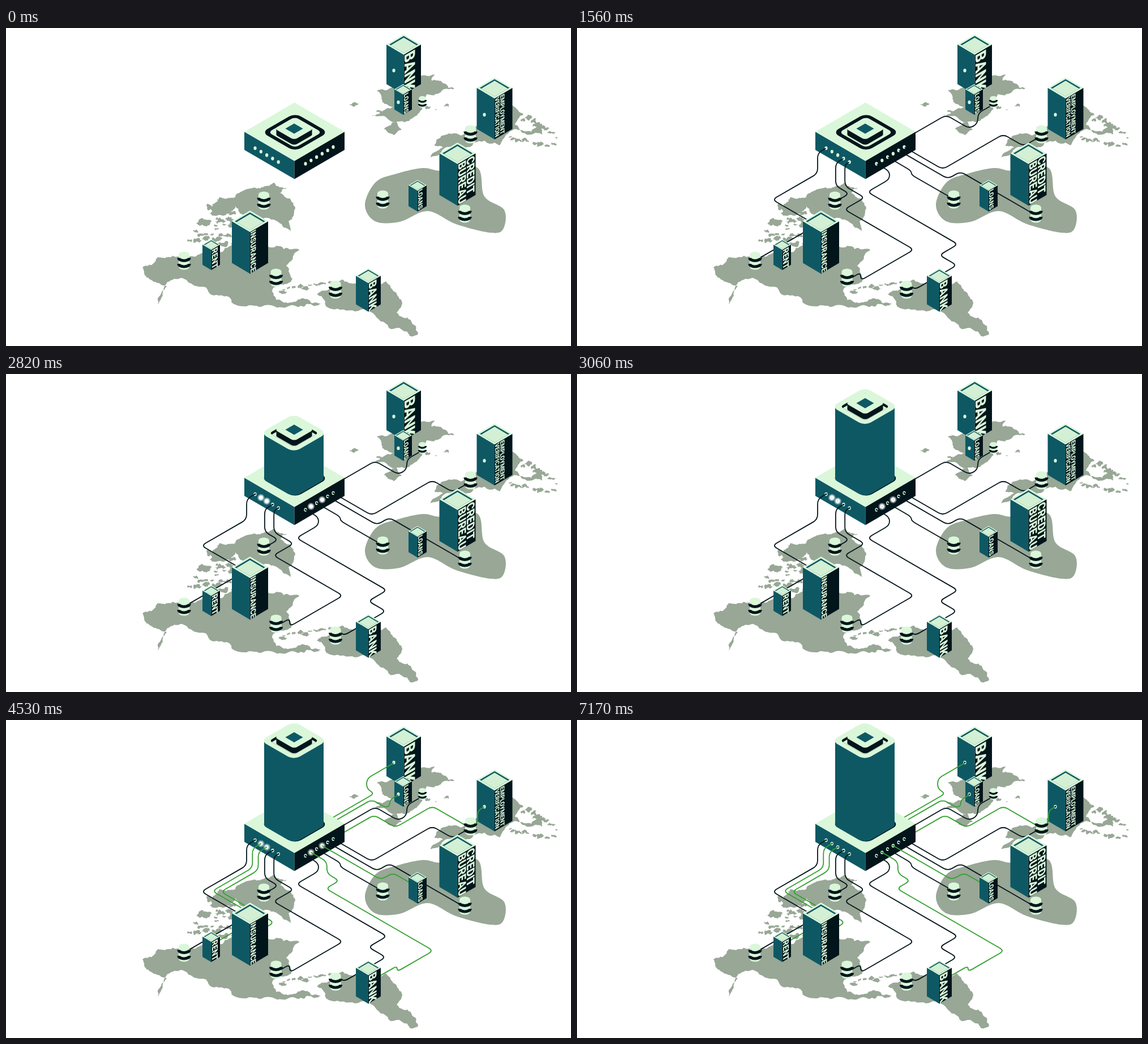
Write an HTML page that moves like this. It is 998 by 561 pixels and loops after 8.16 s.

```html
<!DOCTYPE html>
<html lang="en">
<head>
<meta charset="utf-8">
<title>Connected data network</title>
<style>
html, body { margin: 0; width: 100%; height: 100%; overflow: hidden; background: #fff; }
svg { display: block; width: 100vw; height: 100vh; }
text { font-family: Roboto, Inter, sans-serif; font-weight: 900; fill: #daf7da; }
.wire { fill: none; stroke-width: 1.8; }
</style>
</head>
<body>
<svg id="stage" viewBox="0 0 998 561"></svg>
<script>
const MINT = '#daf7da', TEAL = '#0e5864', DARK = '#02151b', LAND = '#98a796',
      GREEN = '#33a02f', BLUE = '#1e84a8', LOOP = 8160, SLOPE = .577;
const stage = document.getElementById('stage');
const clamp = v => Math.max(0, Math.min(1, v));
const easeOut = (t, start, span) => 1 - (1 - clamp((t - start) / span)) ** 2.1;
const points = s => s.split(' ').map(p => p.split(',').map(Number));
const series = (n, make) => Array.from({ length: n }, (_, i) => make(i));

let seed = 11;
const rnd = () => (seed = seed * 16807 % 2147483647) / 2147483647;

// ---- land ----
// Midpoint displacement turns a few key points into a ragged coast
function rough(pts, amount, depth) {
  if (!depth) return pts;
  const out = [];
  pts.forEach(([x, y], i) => {
    const [u, v] = pts[(i + 1) % pts.length], k = (rnd() - .5) * amount;
    out.push([x, y], [(x + u) / 2 + (v - y) * k, (y + v) / 2 - (u - x) * k]);
  });
  return rough(out, amount, depth - 1);
}
const shape = (pts, fill = LAND) => `<polygon points="${pts.map(p => p.map(v => v.toFixed(1))).join(' ')}" fill="${fill}"/>`;
const coast = s => shape(rough(points(s), .36, 4));

// Closed Catmull-Rom curve through the key points
function smooth(s) {
  const p = points(s), n = p.length, at = i => p[(i + n) % n];
  const pull = (a, b, c) => a.map((v, j) => v + (c[j] - b[j]) / 6);
  const arcs = p.map((q, i) => `C${pull(q, at(i - 1), at(i + 1))} ${pull(at(i + 1), at(i + 2), q)} ${at(i + 1)}`);
  return `<path d="M${p[0]}${arcs.join('')}Z" fill="${LAND}"/>`;
}

// Scatter of small islands along a line
const islands = (x0, y0, x1, y1, spread, count, size) => series(count, i => {
  const k = (i + rnd()) / count, r = size * (.4 + rnd());
  const x = x0 + (x1 - x0) * k, y = y0 + (y1 - y0) * k + (rnd() - .5) * spread;
  return shape(rough(series(6, j => {
    const q = r * (.5 + rnd());
    return [x + Math.cos(j * 1.047) * q * 1.4, y + Math.sin(j * 1.047) * q * .7];
  }), .7, 2));
}).join('');

const land =
  // North America, Arctic, Greenland
  coast('241,422 268,404 304,403 346,397 400,382 463,386 518,391 495,419 506,443 470,463 478,480 504,484 528,478 556,486 515,492 443,490 376,472 320,446 298,442 268,488 284,455 248,440') +
  series(5, i => islands(372 - 13 * i, 306 + 18 * i, 405, 306 + 18 * i, 14, 9, 5)).join('') +
  coast('378,298 408,298 402,320 360,328') +
  coast('403,304 432,283 474,273 497,281 484,291 511,318 499,341 503,358 455,336 412,325') +
  islands(484, 463, 574, 450, 7, 12, 4) +
  // South America
  coast('549,470 577,448 612,451 672,447 684,464 699,488 690,502 728,540 714,544 652,507 570,494') +
  // Europe
  coast('655,111 690,104 757,82 752,93 792,107 743,117 736,139 712,164 646,155 684,140') +
  coast('668,178 690,164 699,179 686,189') + coast('606,135 614,131 623,134 614,139') +
  islands(648, 148, 785, 140, 14, 10, 3) +
  // Asia
  coast('750,228 772,211 757,208 770,190 832,172 895,137 914,152 899,171 908,180 872,207 800,211') +
  coast('908,180 946,174 947,188 918,187') +
  islands(895, 148, 974, 190, 12, 14, 4) + islands(885, 194, 968, 207, 6, 14, 3.5) +
  // Africa
  smooth('634,312 653,272 690,257 736,247 770,252 832,246 845,297 880,321 878,355 855,361 795,346 745,323 695,342 652,341');

// ---- isometric parts ----
const tile = (cx, cy, a, r, fill) =>
  `<rect x="${-a}" y="${-a}" width="${2 * a}" height="${2 * a}" rx="${r}" fill="${fill}" transform="matrix(.866 .5 -.866 .5 ${cx} ${cy})"/>`;
const diamond = (cx, cy, w, h, fill) => shape([[cx, cy - h], [cx + w, cy], [cx, cy + h], [cx - w, cy]], fill);
const side = (cx, cy, w, h, H, fill) => shape([[cx + w, cy], [cx, cy + h], [cx, cy + h + H], [cx + w, cy + H]], fill);
const box = (cx, cy, w, h, H) =>
  side(cx, cy, -w, h, H, TEAL) + side(cx, cy, w, h, H, DARK) + diamond(cx, cy, w, h, MINT);

// Lettering runs down the right face, the last line next to the front edge
function building(cx, top, w, size, ...lines) {
  const h = w * .59, cy = top + h;
  const text = lines.map((s, i) => {
    const shift = (lines.length - 1 - i) * size * .8;
    return `<text font-size="${size}" transform="matrix(0 1 -1 ${SLOPE} ${cx + 1.2 + shift} ${cy + h - shift * SLOPE})">${s}</text>`;
  });
  return box(cx, cy, w, h, w * 2.3) + diamond(cx, cy, w * .83, h * .83, TEAL) +
    diamond(cx, cy + h * .08, w * .75, h * .75, '#d3f0d4') + text.join('');
}

function drum([x, y], s = 1) {
  const band = v => `<path d="M-9.5 ${v}A9.5 5 0 0 0 9.5 ${v}" fill="none" stroke="${DARK}" stroke-width="5.2"/>`;
  return `<g transform="translate(${x} ${y}) scale(${s})"><path d="M-9.5-10A9.5 5.5 0 0 1 9.5-10V11A9.5 5.5 0 0 1-9.5 11Z" fill="${MINT}"/>${band(-4.5)}${band(6)}</g>`;
}

const port = ([x, y]) => `<ellipse cx="${x}" cy="${y}" rx="2.6" ry="3.2" fill="${MINT}"/>`;
const plug = ([x, y]) => `<circle cx="${x}" cy="${y}" r="1.4" fill="${DARK}"/>`;
const glow = ([x, y]) => `<circle cx="${x}" cy="${y}" r="7" fill="url(#halo)"/>`;

const ports = [...series(5, i => [440 + 10.3 * i, 212 + 6.1 * i]), ...series(6, i => [529 + 9.8 * i, 239.5 - 5.9 * i])];
const lit = [1, 2, 6, 8].map(i => ports[i]);
const doors = points('685,75 693,131 845,153');

// ---- wires ----
// A route is a start and steps along the grid: e/w fall, n/v rise (right/left), s/u are vertical
const STEPS = { e: [1, SLOPE], w: [-1, SLOPE], n: [1, -SLOPE], v: [-1, -SLOPE], s: [0, 1], u: [0, -1] };
function route(x, y, steps) {
  const p = [[x, y]];
  for (const s of steps.split(' ')) {
    const [dx, dy] = STEPS[s[0]], n = +s.slice(1);
    p.push([x += dx * n, y += dy * n]);
  }
  return p;
}
function rounded(p) {
  let d = 'M' + p[0];
  for (let i = 1; i < p.length - 1; i++) {
    const toward = ([x, y]) => {
      const dx = x - p[i][0], dy = y - p[i][1], len = Math.hypot(dx, dy), k = Math.min(9, len / 2) / len;
      return [p[i][0] + dx * k, p[i][1] + dy * k];
    };
    d += `L${toward(p[i - 1])}Q${p[i]} ${toward(p[i + 1])}`;
  }
  return d + 'L' + p[p.length - 1];
}
const wire = (d, kind, color) => `<path class="wire ${kind}" d="${d}" stroke="${color}"/>`;
const black = (x, y, steps) => wire(rounded(route(x, y, steps).reverse()), 'black', DARK);
const green = (x, y, steps) => {
  const d = rounded(route(x, y, steps));
  return wire(d, 'green', GREEN) + wire(d, 'tip', BLUE);
};

const frontWires =
  black(...ports[0], 'w15 s36 w80 e78 w108') +
  black(...ports[3], 'w14 s40 e24 w19') +
  black(...ports[4], 'w8 s38 e35 w36 e123 w94 u14 w16') +
  black(...ports[5], 'e23 s14 w39 e160 w33 e31 w73 v7 w8') +
  black(...ports[7], 'e42 s7 e70') +
  black(...ports[9], 'e87 n22 e130') +
  black(...ports[10], 'e68 n107 e36 n26') +
  green(...ports[1], 'w15 s34 w71 e61') +
  green(...ports[2], 'w15 s32 w66 e94 w33 v21 w48') +
  green(...ports[6], 'e28 s21 e22 w24 e190 w64 u10 w29') +
  green(...ports[8], 'e104 n21 e39');

const rearWires = black(575, 198, 'n77 e41 n15 u18 n28');
const doorWires =
  green(560, 182, 'n91 v14 u18 n48') +
  green(560, 190, 'n86 e25 n7 u10 n15') +
  green(580, 208, 'n70 e38 n65 e66 n14 u22 n12');

const hub = box(509.5, 183, 88.5, 51.5, 32) + tile(510.5, 184, 34, 12, DARK) + tile(510.5, 184, 27.3, 7, MINT);
const hole = tile(508.5, 183.5, 25, 5, DARK);
const tower = `<g id="tower">${tile(508.5, 183.5, 34, 12, TEAL)}<rect id="shaft" x="456" width="105" fill="${TEAL}"/></g>
  <g id="lift"><g id="roof">${tile(508.5, 183.5, 34, 12, MINT)}${hole}
  <g clip-path="url(#hole)">${tile(508.5, 188.5, 25, 5, MINT)}</g></g>
  ${series(6, i => tile(509, 187.5 - 2 * i, 20, 6, i < 5 ? DARK : MINT)).join('')}${tile(509, 177.5, 9, 0, TEAL)}</g>`;

stage.innerHTML = `<defs>
  <radialGradient id="halo"><stop offset=".4" stop-color="#fff"/><stop offset="1" stop-color="#fff" stop-opacity="0"/></radialGradient>
  <clipPath id="hole">${hole}</clipPath>
  <clipPath id="doorways"><path d="M671 25H703V118H671ZM685 105H702V150H685ZM831 100H863V180H831Z"/></clipPath></defs>` +
  land + rearWires + doorWires + hub + ports.map(port).join('') + tower +
  `<g id="plugs">${ports.map(plug).join('')}</g><g id="glows">${lit.map(glow).join('')}</g>` + frontWires +
  building(702.5, 11, 30.5, 26, 'BANK') +
  building(701.5, 99, 15.5, 11, 'LOANS') +
  building(863, 87, 31.5, 10.5, 'EMPLOYMENT', 'VERIFICATION') +
  building(797.5, 202, 32, 19, 'CREDIT', 'BUREAU') +
  building(727, 268, 16, 11, 'LOANS') +
  building(362.5, 373, 15.5, 14, 'RENT') +
  building(431, 322, 32, 13.2, 'INSURANCE') +
  building(640, 424, 22, 19, 'BANK') +
  doors.map(port).join('') +
  `<g clip-path="url(#doorways)">${doorWires}</g><g id="sockets">${doors.map(plug).join('')}</g>` +
  points('314.5,410 455.5,304 477,440 582,461 665.5,302 810.5,327 820.5,187').map(p => drum(p)).join('') +
  drum([735.5, 130], .65);

// ---- motion ----
const $ = id => document.getElementById(id);
const wires = kind => [...stage.querySelectorAll('.' + kind)].map(el => ({ el, len: el.getTotalLength() }));
const blacks = wires('black'), greens = wires('green'), tips = wires('tip');

function reveal({ el, len }, from, to) {
  el.style.visibility = to > from ? '' : 'hidden';
  el.setAttribute('stroke-dasharray', `0 ${from} ${to - from} ${len + 9}`);
}

function draw(t) {
  const inbound = easeOut(t, 30, 1650), outbound = easeOut(t, 3060, 1470);
  blacks.forEach(w => reveal(w, 0, w.len * inbound));
  greens.forEach(w => reveal(w, 0, w.len * outbound));
  tips.forEach(w => {
    const head = w.len * outbound;
    reveal(w, head - Math.min(24, head, w.len - head), head);
  });

  const q = clamp((t - 2655) / 880);
  const rise = 147 * (1 - Math.exp(-4 * q)) / (1 - Math.exp(-4));
  $('lift').setAttribute('transform', `translate(0 ${-rise})`);
  $('shaft').setAttribute('y', 183.5 - rise);
  $('shaft').setAttribute('height', rise);
  $('tower').style.display = $('roof').style.display = rise ? '' : 'none';

  $('plugs').style.opacity = clamp((t - 1710) / 180);
  $('glows').style.opacity = clamp((t - 2430) / 120) * (1 - clamp((t - 4400) / 900));
  $('sockets').style.opacity = clamp((t - 4560) / 600);
}

const begin = performance.now();
(function tick() {
  draw((performance.now() - begin) % LOOP);
  requestAnimationFrame(tick);
})();
</script>
</body>
</html>
```
